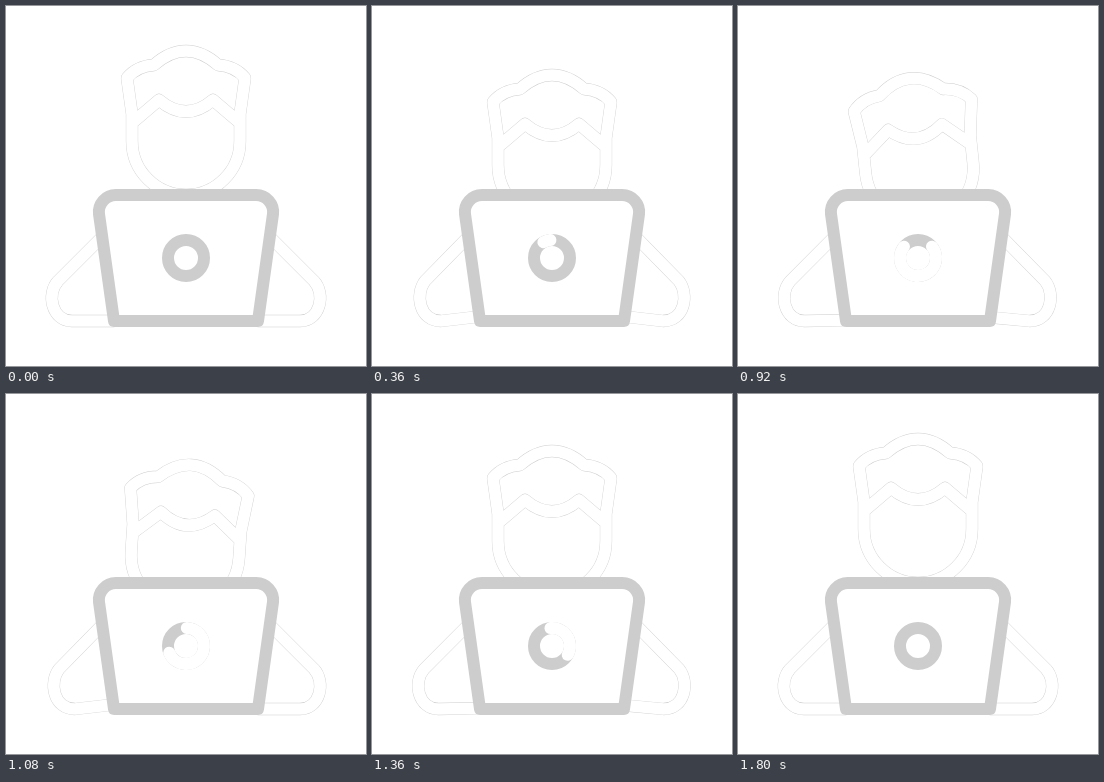
An HTML page with a canvas that plays this animation: 360x360 px, repeating every 2000 ms.

```html
<!DOCTYPE html>
<html lang="en">
<head>
<meta charset="utf-8">
<title>Typing at a laptop</title>
<style>
html, body { margin: 0; width: 100%; height: 100%; overflow: hidden; background: #fff; }
canvas { display: block; }
</style>
</head>
<body>
<canvas id="stage" width="360" height="360"></canvas>
<script>
const ctx = document.getElementById('stage').getContext('2d');
const GREY = '#cdcdcd', LOOP = 2000, STEP = 40;
const { PI, sin, cos, min, max } = Math;
const RAD = PI / 180;

const head = new Path2D(
  'M121 72 Q131 60 148 59 C158 50 168 45 180 45 C192 45 202 50 212 59 Q229 60 239 72' +
  'L234 108 V135 A54 54 0 0 1 126 135 V108 Z' +
  'M126 117 L153 94 Q180 117 207 94 L234 117');
const laptop = new Path2D(
  'M108 315 L93 208 A17 17 0 0 1 110 189 H250 A17 17 0 0 1 267 208 L252 315 Z');

// Progress from 0 to 1 between two times
const linear = (t, from, to) => min(1, max(0, (t - from) / (to - from)));
const ease = (t, from, to) => (1 - cos(PI * linear(t, from, to))) / 2;

function stroke(path, color, width) {
  ctx.strokeStyle = color;
  ctx.lineWidth = width;
  ctx.stroke(path);
}

// White band with a faint hairline on both edges
function band(path) {
  stroke(path, GREY, 12.3);
  stroke(path, '#fff', 11.6);
}

function drawHead(t) {
  const sway = linear(t, 600, 1200);
  const drop = 24 * (ease(t, 40, 350) - ease(t, 1160, 1560)) + 3 * sin(PI * sway);
  ctx.save();
  ctx.translate(180, 122 + drop);
  ctx.rotate(-6 * RAD * sin(2 * PI * sway ** 2.2));
  ctx.translate(-180, -122);
  band(head);
  ctx.restore();
}

// A hand lifts, holds until its beat starts, then types until it settles
function lift(t, beat) {
  const wave = (1 + cos(2 * PI * max(0, t - beat) / 440)) / 2;
  return wave * ease(t, 80, 320) * (1 - ease(t, 1540, 1740));
}

function drawArm(k, mirrored) {
  ctx.save();
  if (mirrored) {
    ctx.translate(360, 0);
    ctx.scale(-1, 1);
  }
  band(new Path2D(
    `M98 229 L${52 + k} 275 C${40 + 3 * k} 288 ${46 + k} 315 ${66 + 3 * k} 315 L108 ${315 - 4.5 * k}`));
  ctx.restore();
}

function ring(from, to) {
  const path = new Path2D();
  path.arc(180, 252, 18, from * RAD, to * RAD);
  return path;
}

// A white arc wipes the ring away, then its tail brings the grey back
function drawRing(t) {
  stroke(ring(0, 360), GREY, 12);
  const from = 265 - 360 * ease(t, 200, 1170);
  const to = 265 - 360 * ease(t, 640, 1840);
  if (to - from > 2) stroke(ring(from, to), '#fff', 12);
}

function draw(t) {
  ctx.fillStyle = '#fff';
  ctx.fillRect(0, 0, 360, 360);
  ctx.lineCap = ctx.lineJoin = 'round';
  drawHead(t);
  drawArm(lift(t, 640), false);
  drawArm(lift(t, 420), true);
  ctx.fill(laptop);
  stroke(laptop, GREY, 12);
  drawRing(t);
}

function frame(now) {
  draw(Math.floor(now % LOOP / STEP) * STEP);
  requestAnimationFrame(frame);
}
frame(0);
</script>
</body>
</html>
```
